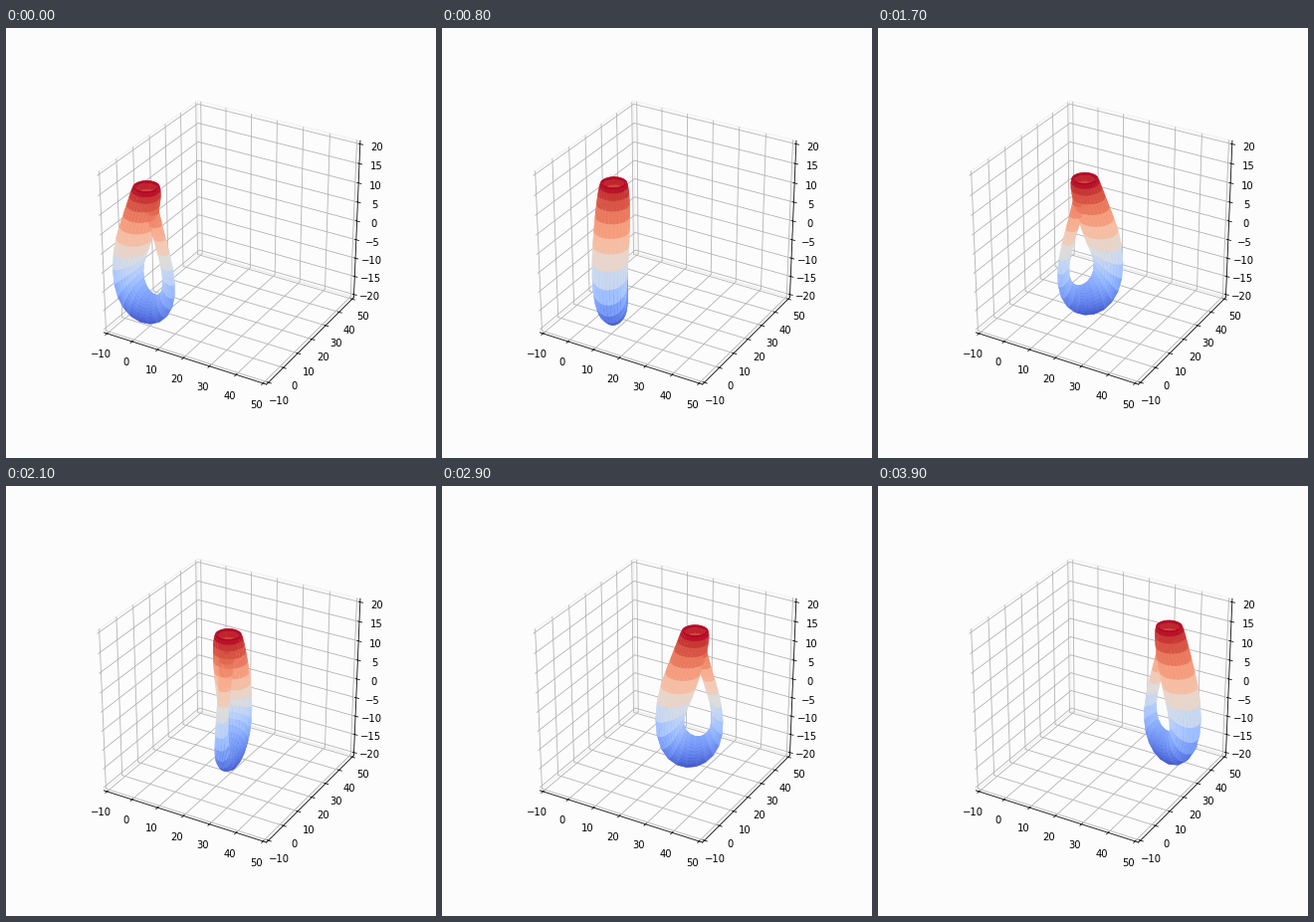
These frames come from a looping animation (432 px wide and 432 px high, 4 s). A matplotlib script:

```python
import numpy as np
import matplotlib.pyplot as plt
from matplotlib.animation import FuncAnimation

FRAMES = 40
INTERVAL = 100
SHIFT = 36 / 39                  # travel along x and y per frame
SPIN = 3 * np.pi / FRAMES        # turn about the vertical axis per frame
SAMPLES = 30
BACKGROUND = "#fcfcfc"


def klein_bottle(samples):
    """Upside-down Klein bottle: profile x, depth y, height z."""
    u, v = np.meshgrid(np.linspace(0, 2 * np.pi, samples),
                       np.linspace(0, 2 * np.pi, samples))
    radius = 4 * (1 - np.cos(u) / 2)
    spine = 6 * np.cos(u) * (1 + np.sin(u))
    bend = u < np.pi
    x = spine + radius * np.cos(v) * np.where(bend, np.cos(u), -1)
    y = radius * np.sin(v)
    z = -16 * np.sin(u) - radius * np.cos(v) * np.where(bend, np.sin(u), 0)
    return x, y, z


def make_axes(fig):
    ax = fig.add_axes([0.125, 0.125, 0.775, 0.755], projection="3d",
                      facecolor="none")
    # Fill the whole rectangle instead of the largest square in it.
    ax.apply_aspect = lambda position=None: None
    ax.set_box_aspect((1, 1, 1), zoom=np.sqrt(3) / 1.8294640721620434)
    ax.view_init(elev=30, azim=-60)
    ax.set_xticks(range(-10, 51, 10))
    ax.set_yticks(range(-10, 51, 10))
    ax.set_zticks(range(-20, 21, 5))
    ax.set_xlim(-10, 50)
    ax.set_ylim(-10, 50)
    ax.set_zlim(-20, 20)
    for axis in (ax.xaxis, ax.yaxis, ax.zaxis):
        axis.pane.fill = False
        axis.pane.set_edgecolor((0.9, 0.9, 0.9, 0.5))
    return ax


plt.rcParams["axes3d.automargin"] = True
fig = plt.figure(figsize=(6, 6), dpi=72, facecolor=BACKGROUND)
ax = make_axes(fig)
X, Y, Z = klein_bottle(SAMPLES)
surfaces = []


def draw(i):
    while surfaces:
        surfaces.pop().remove()
    c, s = np.cos(SPIN * i), np.sin(SPIN * i)
    shift = SHIFT * i
    surfaces.append(ax.plot_surface(
        X * c - Y * s + shift, X * s + Y * c + shift, Z,
        rstride=1, cstride=1, cmap="coolwarm", linewidth=0))
    return surfaces


anim = FuncAnimation(fig, draw, frames=FRAMES, interval=INTERVAL,
                     repeat=True, repeat_delay=0, blit=False)
plt.show()
```
